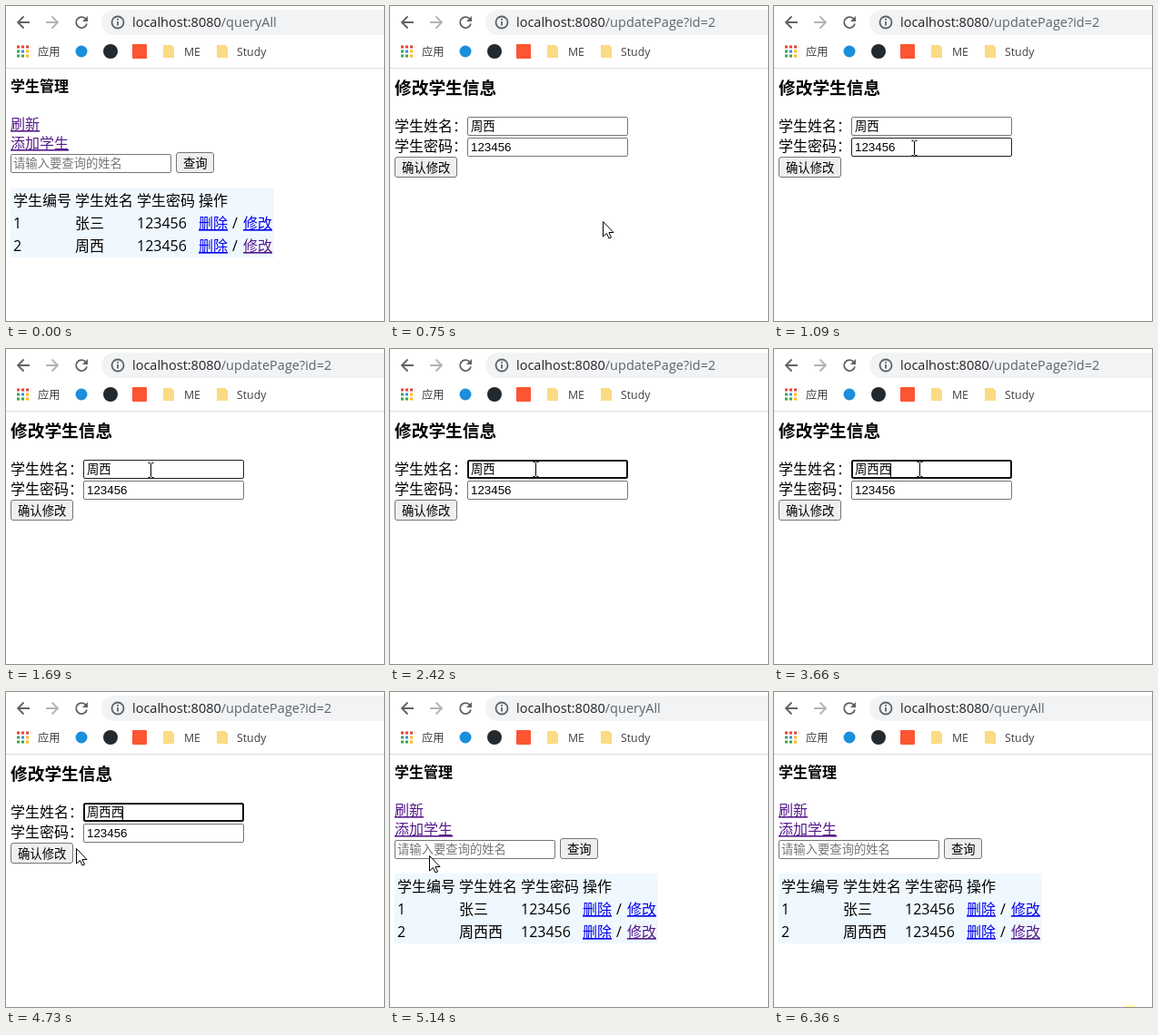
Animation, 416 px wide and 347 px high, one loop 6.43 s. Source, as an HTML page:

```html
<!DOCTYPE html>
<html lang="zh-CN">
<head>
<meta charset="utf-8">
<title>学生管理</title>
<style>
html, body { margin: 0; width: 100%; height: 100%; overflow: hidden; background: #fff; }
svg { display: block; }
text { font: 16px "Open Sans", "Noto Sans CJK SC", sans-serif; white-space: pre; }
.bar { font-size: 12.3px; fill: #3c4043; }
.url { font-size: 14.5px; fill: #202124; }
.url tspan { fill: #5f6368; }
.bold { font-weight: 700; }
.form { font: 13.333px "Liberation Sans", "Noto Sans CJK SC", sans-serif; }
.label { font-family: "Noto Sans CJK JP", sans-serif; }
.link { fill: #0000ee; text-decoration: underline; }
.visited { fill: #551a8b; }
.field { fill: #fff; stroke: #767676; }
.button { fill: #efefef; stroke: #767676; }
.hover { stroke: #222; }
.button.hover { fill: #e5e5e5; stroke: #4f4f4f; }
.button.pressed { fill: #f5f5f5; stroke: #8d8d8d; }
.field.focus { stroke: #101010; stroke-width: 2; }
.candidate { font-size: 18px; }
.number { font-size: 18px; fill: #666; }
.icon { fill: none; stroke: #5f6368; stroke-width: 1.8; }
</style>
</head>
<body>
<svg width="416" height="347" viewBox="0 0 416 347">
  <path class="icon" d="M26 18H13.5M19.5 11.5L13 18l6.500 6.500"/>
  <path class="icon" style="stroke:#b0b3b6" d="M44 18H56.500M50.500 11.500L57 18l-6.500 6.500"/>
  <path class="icon" d="M88 14.500A6 6 0 1 0 89 19.500"/>
  <path fill="#5f6368" d="M90 11v6h-6z"/>
  <rect x="105" y="4" width="340" height="28" rx="14" fill="#f1f3f4"/>
  <circle class="icon" cx="123" cy="18" r="6.500" stroke-width="1.500"/>
  <path class="icon" d="M123 17v4.500M123 14v1.700"/>
  <text class="url" x="139" y="23">localhost:8080<tspan id="path"></tspan></text>
  <g id="apps"></g>
  <text class="bar" x="35" y="54.500">应用</text>
  <circle cx="83" cy="50" r="6.500" fill="#1b8fdc"/>
  <circle cx="115" cy="50" r="8" fill="#24292e"/>
  <rect x="139" y="42" width="16" height="16" rx="1" fill="#fc5531"/>
  <path id="folder" fill="#fbdb83" d="M173 43h10v2h2v12h-12z"/>
  <use href="#folder" x="59"/>
  <text class="bar" x="196" y="54.500">ME</text>
  <text class="bar" x="254" y="54.500">Study</text>
  <path stroke="#dadce0" d="M0 68.500H416"/>

  <g id="listPage">
    <text class="bold" x="5" y="94">学生管理</text>
    <text class="link visited" x="5" y="136">刷新</text>
    <text class="link visited" x="5" y="157">添加学生</text>
    <rect class="field" x="5.500" y="163.500" width="176" height="20" rx="1.500"/>
    <text class="form" x="8" y="178" fill="#757575">请输入要查询的姓名</text>
    <rect class="button" x="187.500" y="161.500" width="41" height="22" rx="2.500"/>
    <text class="form" x="195" y="178">查询</text>
    <rect x="5" y="200" width="290" height="77" fill="#f0f8ff"/>
    <g id="table"></g>
  </g>

  <g id="editPage">
    <text class="bold" x="5" y="97" style="font-size:18.720px">修改学生信息</text>
    <text class="label" x="5" y="138">学生姓名：</text>
    <text class="label" x="5" y="160">学生密码：</text>
    <rect id="nameField" class="field" rx="1.500"/>
    <rect id="passField" class="field" x="85.500" y="145.500" width="176" height="20" rx="1.500"/>
    <text id="name" class="form" x="89" y="137"></text>
    <text class="form" x="89" y="160">123456</text>
    <rect id="submit" class="button" x="5.500" y="166.500" width="68" height="22" rx="2.500"/>
    <text class="form" x="13" y="182.500">确认修改</text>
    <path id="composing" stroke="#000" stroke-dasharray="1 1"/>
    <path id="caret" stroke="#000"/>
    <g id="popup"></g>
  </g>

  <ellipse id="glow" cx="392" cy="347" rx="6" ry="2" fill="#ffff8c"/>
  <g id="pointer" stroke="#000" fill="#fff" stroke-linejoin="round">
    <path id="arrow" d="M0 0V16.500L4 13 6.500 18.500 9 17.500 6.500 12H11.500Z"/>
    <path id="hand" d="M-1.500 13V1.500Q0-1 1.500 1.500V8Q4 6 5 8.500 8 7 8.500 9.500 11 9 11 11.500V16Q11 19 9 22H0L-5 15Q-6 11-3 12.500Z"/>
    <path id="beam" fill="none" d="M-3-8H-1L0-7 1-8H3M0-7V7M-3 8H-1L0 7 1 8H3"/>
  </g>
</svg>
<script>
const LOOP = 6430, EDIT_OPEN = 550, EDIT_CLOSE = 5070;
const $ = id => document.getElementById(id);
const show = (id, on) => { $(id).style.display = on ? '' : 'none'; };
const label = (x, y, text, cls = '') => `<text x="${x}" y="${y}" class="${cls}">${text}</text>`;
const within = (t, from, to) => t >= from && t < to;

// start, end, number of steps, target x, target y
const MOVES = [
  [70, 280, 4, 266, 270],
  [620, 1090, 7, 154, 156],
  [1220, 1220, 1, 155, 145],
  [1290, 1290, 1, 156, 144],
  [1560, 1700, 3, 160, 128],
  [1770, 1770, 1, 160, 132],
  [4520, 4730, 4, 77, 172],
  [4800, 4870, 2, 43, 180],
  [5400, 5680, 5, 407, 370]
];

// time, typed pinyin, candidates
const COMPOSITION = [
  [2980, 'x', ['下', '想', '小', '行', '先']],
  [3040, 'xi', ['西', '系', '洗', '细', '喜']],
  [3190, "xi'xi", ['西西', '嘻嘻', '细细', '夕夕']]
];

const DOTS = ['#ea4335', '#ea4335', '#ea4335', '#34a853', '#4285f4', '#fbbc04', '#34a853', '#34a853', '#fbbc04'];
$('apps').innerHTML = DOTS.map((color, i) =>
  `<rect x="${12 + i % 3 * 5}" y="${43.5 + (i / 3 | 0) * 5}" width="3" height="3" fill="${color}"/>`).join('');

function tableRow(id, name, y, cls) {
  return label(8, y, id) + label(76, y, name) + label(144, y, '123456') +
    label(212, y, '删除', 'link') + label(249, y, '/') + label(261, y, '修改', 'link ' + cls);
}

function tableMarkup(name) {
  return ['学生编号', '学生姓名', '学生密码', '操作'].map((s, i) => label(8 + 68 * i, 220, s)).join('') +
    tableRow(1, '张三', 245, '') + tableRow(2, name, 270, 'visited');
}

function popupMarkup(words) {
  const pitch = 43 + 18 * words[0].length;
  return '<rect x="102.5" y="141.5" width="330" height="44" fill="#f3f3f3" stroke="#cfcfcf"/>' +
    `<rect x="103" y="142" width="${pitch}" height="43" fill="#a8d8ff"/>` +
    words.map((word, i) => label(115 + pitch * i, 170, i + 1, 'number') +
      label(134 + pitch * i, 170, word, 'candidate')).join('');
}

function pointerAt(t) {
  let x = 312.7, y = 346;
  for (const [start, end, steps, tx, ty] of MOVES) {
    if (t < start) break;
    const gap = (end - start) / (steps - 1) || 1;
    const p = Math.min(1, (Math.floor((t - start) / gap + 1e-6) + 1) / steps);
    x += (tx - x) * p;
    y += (ty - y) * p;
  }
  return [x, y];
}

const cache = {};
function setMarkup(id, markup) {
  if (cache[id] !== markup) $(id).innerHTML = cache[id] = markup;
}

function render(t) {
  const editing = within(t, EDIT_OPEN, EDIT_CLOSE);
  const [x, y] = pointerAt(t);
  const inside = (x0, y0, x1, y1) => x >= x0 && x < x1 && y >= y0 && y < y1;

  show('editPage', editing);
  show('listPage', !editing);
  setMarkup('path', editing ? '/updatePage?id=2' : '/queryAll');
  setMarkup('table', tableMarkup(t < EDIT_CLOSE ? '周西' : '周西西'));

  const overName = editing && inside(85, 122, 262, 143);
  const overPass = editing && inside(85, 145, 262, 166);
  const overSubmit = editing && inside(5, 166, 74, 189);
  const focused = within(t, 1890, 5010);
  const inset = focused ? 1 : 0.5;
  const nameField = $('nameField');
  nameField.setAttribute('class', 'field' + (focused ? ' focus' : overName ? ' hover' : ''));
  nameField.setAttribute('x', 85 + inset);
  nameField.setAttribute('y', 122 + inset);
  nameField.setAttribute('width', 177 - 2 * inset);
  nameField.setAttribute('height', 21 - 2 * inset);
  $('passField').setAttribute('class', 'field' + (overPass ? ' hover' : ''));
  $('submit').setAttribute('class', 'button' + (t >= 5010 ? ' pressed' : overSubmit ? ' hover' : ''));

  const step = t < 3660 && COMPOSITION.filter(c => t >= c[0]).pop();
  const name = step ? '周' + step[1] : t < 2640 ? '周西' : t < 2980 ? '周' : '周西西';
  setMarkup('name', name);
  const end = editing ? Math.round(89 + $('name').getComputedTextLength()) - 0.5 : 0;
  $('caret').setAttribute('d', `M${end} 126V141`);
  show('caret', within(t, 1890, 2420) || within(t, 2980, 4190) || within(t, 4730, 5010));
  $('composing').setAttribute('d', `M102 139.5H${end}`);
  show('composing', step);
  setMarkup('popup', step ? popupMarkup(step[2]) : '');

  const shape = overName || overPass ? 'beam' : !editing && inside(261, 256, 293, 277) ? 'hand' : 'arrow';
  for (const id of ['arrow', 'hand', 'beam']) show(id, id === shape);
  show('pointer', within(t, 70, 5680));
  $('pointer').setAttribute('transform', `translate(${Math.round(x) + 0.5} ${Math.round(y) + 0.5})`);
  show('glow', t >= 6360);
}

const begin = performance.now();
function tick() {
  render((performance.now() - begin) % LOOP);
  requestAnimationFrame(tick);
}
tick();
</script>
</body>
</html>
```
